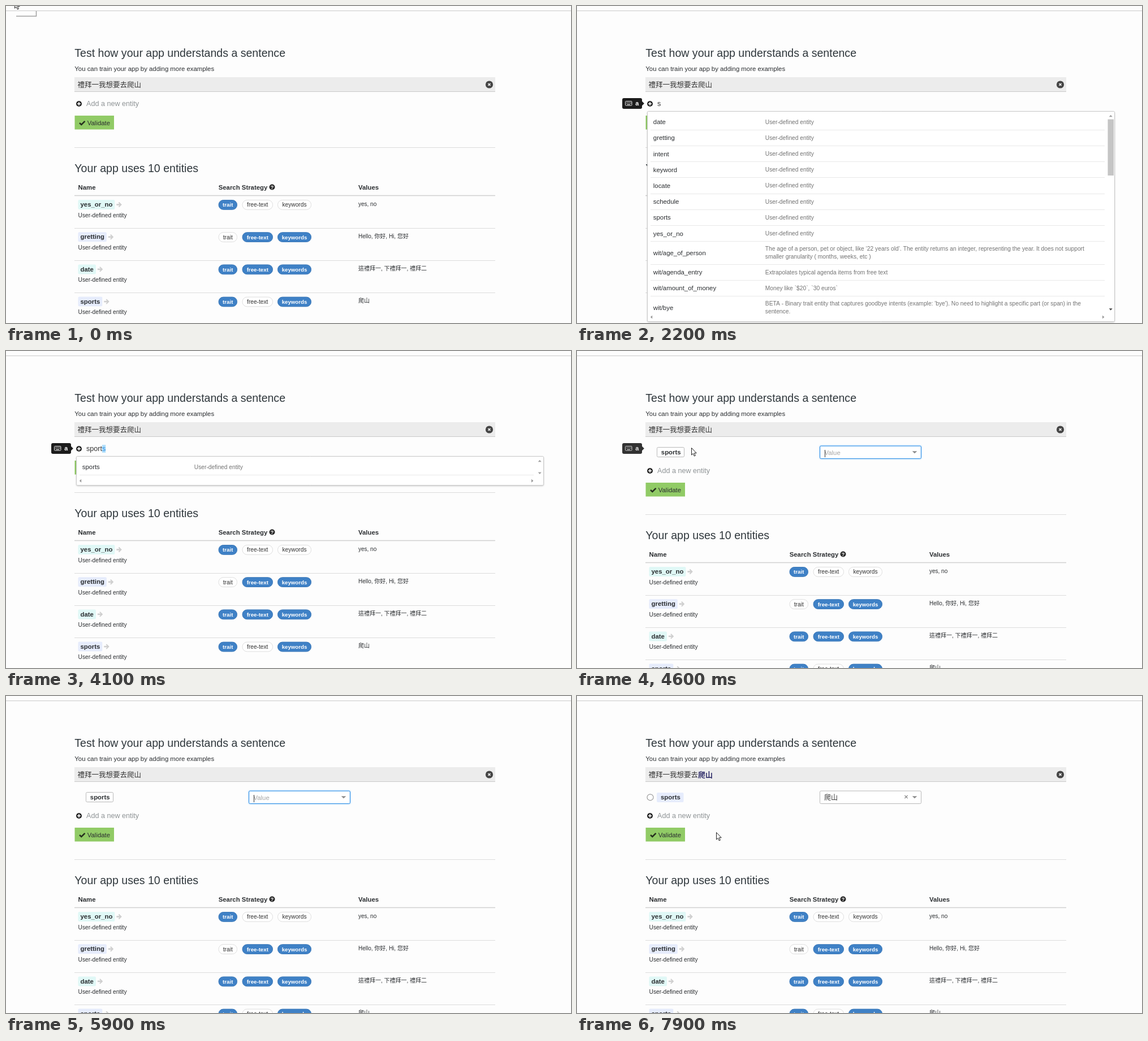
An HTML page with a canvas for the animation above (8000 ms loop, 999x561 px).

```html
<!DOCTYPE html>
<html lang="en">
<head>
<meta charset="utf-8">
<title>Entity trainer</title>
<style>
  html, body { margin: 0; width: 999px; height: 561px; overflow: hidden; background: #fdfdfd; }
  canvas { display: block; }
</style>
</head>
<body>
<canvas id="stage" width="999" height="561"></canvas>
<script>
const g = document.getElementById('stage').getContext('2d');
const LOOP = 8000;
const FONT = '"Liberation Sans", Arial, "Noto Sans CJK TC", "Noto Sans CJK", sans-serif';
const BODY = 11.38, SMALL = 10.26, TITLE = 19.56;
const DARK = '#2b2e31', GREY = '#737373', LILAC = '#e6ecfc', AQUA = '#e0f8f6';
const USER = 'User-defined entity';
const SENTENCE = '禮拜一我想要去爬山';

const entities = [
  { name: 'yes_or_no', tint: AQUA, on: [1, 0, 0], values: 'yes, no' },
  { name: 'gretting', tint: LILAC, on: [0, 1, 1], values: 'Hello, 你好, Hi, 您好' },
  { name: 'date', tint: AQUA, on: [1, 1, 1], values: '這禮拜一, 下禮拜一, 禮拜二' },
  { name: 'sports', tint: LILAC, on: [1, 0, 1], values: '爬山' }
];
const pills = [['trait', 375.5, 33.5], ['free-text', 417.5, 54.5], ['keywords', 480, 60]];

const allOptions = [
  ...['date', 'gretting', 'intent', 'keyword', 'locate', 'schedule', 'sports', 'yes_or_no'].map(n => [n, USER]),
  ['wit/age_of_person', 'The age of a person, pet or object, like ‘22 years old’. The entity returns an integer, representing the year. It does not support', 'smaller granularity ( months, weeks, etc )'],
  ['wit/agenda_entry', 'Extrapolates typical agenda items from free text'],
  ['wit/amount_of_money', 'Money like `$20`, `30 euros`'],
  ['wit/bye', "BETA - Binary trait entity that captures goodbye intents (example: 'bye'). No need to highlight a specific part (or span) in the", 'sentence.']
];
const sOptions = [
  ['schedule', USER], ['sports', USER],
  ['wit/search_query', 'Captures free text to be used as a query for a search engine. The part to look up has to be highlighted in', 'the sentence.']
];

// Pointer stops as [ms, x, y]; without a position the arrow is hidden
const pointer = [
  [0, 15, -9], [100, 14, 14], [200, 42, 68], [300, 96, 118], [400, 152, 150], [500, 190, 165], [600],
  [4600, 202, 171], [5400, 420, 214], [5500, 578, 234], [5600, 584, 216], [5700, 560, 196], [5800],
  [6000, 330, 160], [6100, 250, 153], [6200], [7700, 246, 168], [7800, 249, 215], [7900, 246, 241]
];
const typed = [[2200, 1], [2500, 2], [2700, 3], [3800, 4], [4100, 5], [4400, 6]];

const latest = (list, t) => list.filter(s => s[0] <= t).pop();
const within = (t, a, b) => t >= a && t < b;

function text(s, x, y, size = BODY, color = DARK, bold = false, align = 'left') {
  g.font = `${bold ? 'bold ' : ''}${size}px ${FONT}`;
  g.fillStyle = color;
  g.textAlign = align;
  g.fillText(s, x, y);
  return g.measureText(s).width;
}

function rect(x, y, w, h, fill, radius = 0, border) {
  g.beginPath();
  g.roundRect(x, y, w, h, radius);
  if (fill) { g.fillStyle = fill; g.fill(); }
  if (border) { g.strokeStyle = border; g.lineWidth = 1; g.stroke(); }
}

function path(points, fill, stroke, width = 1) {
  g.beginPath();
  points.forEach(p => g.lineTo(...p));
  if (fill) { g.closePath(); g.fillStyle = fill; g.fill(); }
  if (stroke) { g.strokeStyle = stroke; g.lineWidth = width; g.stroke(); }
}

function disc(x, y, r, fill, stroke) {
  g.beginPath();
  g.arc(x, y, r, 0, 7);
  if (fill) { g.fillStyle = fill; g.fill(); }
  if (stroke) { g.strokeStyle = stroke; g.lineWidth = 1.2; g.stroke(); }
}

function cross(x, y, r, color, width) {
  path([[x - r, y - r], [x + r, y + r]], null, color, width);
  path([[x - r, y + r], [x + r, y - r]], null, color, width);
}

// Small triangle pointing along (dx, dy)
function triangle(x, y, dx, dy, color, w = 3, h = 1.7) {
  path([[x + dx * h, y + dy * h], [x - dx * h + dy * w, y - dy * h + dx * w],
    [x - dx * h - dy * w, y - dy * h - dx * w]], color);
}

function header(t) {
  rect(0, 8, 999, 1, '#cbcbcb');
  if (t < 100) {
    rect(17, 9, 36, 8, '#fff');
    path([[18, 18], [53.5, 18], [53.5, 9]], null, '#a2a2a2', 1.6);
  }
  text('Test how your app understands a sentence', 121.3, 90, TITLE, '#2f373c');
  text('You can train your app by adding more examples', 121.3, 114.5);
}

function sentence(t) {
  rect(121, 126, 744, 26, '#ececec');
  rect(121, 151, 744, 1, '#c9c9c9');
  disc(854.5, 139, 6.6, '#454545');
  cross(854.5, 139, 2, '#fff', 1.4);

  const picked = within(t, 6700, 7500) ? (t < 6800 ? 1 : 2) : 0;
  const done = t >= 7500;
  const split = done || picked ? 7 : 9;
  let x = 126.5 + text(SENTENCE.slice(0, split), 126.5, 143.7, 12.5, '#333');
  if (picked) {
    rect(x, 132, 12.5 * picked, 14, '#b4dcf7');
    x += text(SENTENCE.slice(7, 7 + picked), x, 143.7, 12.5, '#2b8fe3');
    text(SENTENCE.slice(7 + picked), x, 143.7, 12.5, '#333');
  } else if (done) {
    text(SENTENCE.slice(7), x, 143.7, 12.9, '#2d2b68', true);
  }
  if (within(t, 6200, 7700)) {
    const beam = t < 6300 ? 207 : t < 6400 ? 210 : t < 6700 ? 214 : t < 6800 ? 227 : 242;
    rect(beam, 136, 1, 13, '#f8f8f8');
  }
}

function entityRow(t) {
  const linked = t >= 7200, focused = t < 6600;
  if (linked) {
    disc(129.5, 179.3, 5.5, '#fff', '#999');
    rect(141, 171, 47.5, 17, LILAC, 2);
  } else {
    rect(141.5, 170.5, 48, 17, '#fff', 2, '#b9b9b9');
  }
  text('sports', linked ? 148 : 148.8, 183.3, BODY, DARK, true);

  if (focused) {
    g.shadowColor = '#a5d3fa';
    g.shadowBlur = 3;
  }
  rect(429.5, 168, 179, 22.5, '#fff', 2, focused ? '#2f8fe6' : '#b8b8b8');
  g.shadowBlur = 0;
  triangle(597, 179.3, 0, 1, '#8b8b8b', 4.3, 2);
  if (linked) {
    text('爬山', 437, 184, 12, '#333');
    cross(582, 178.5, 2.6, '#808080', 1.3);
  } else {
    text('Value', 437.5, 183.5, BODY, '#a6a6a6');
  }
  if (within(t, 4600, 5100) || within(t, 5600, 6100)) rect(438, 175, 1, 13, '#333');
}

function addEntity(t) {
  disc(129, 173, 5.1, '#2d2d2d');
  rect(126, 172.2, 6, 1.6, '#fff');
  rect(128.2, 170, 1.6, 6, '#fff');
  const count = t < 4600 && latest(typed, t);
  if (count) {
    const word = t < 2500 ? 'schedule' : 'sports';
    const x = 142 + text(word.slice(0, count[1]), 142, 177, 12.6, '#333');
    const rest = t < 2300 ? '' : word.slice(count[1]);
    if (rest) {
      rect(x, 166, g.measureText(rest).width, 14, '#b4e0fb');
      text(rest, x, 177, 12.6, '#2b8fe3');
    }
  } else {
    text('Add a new entity', 142, 177, 12.6, within(t, 700, 4600) ? '#b8bcbf' : '#8f9496');
  }
  if (within(t, 700, 1200) || within(t, 1700, 2200)) rect(142, 167, 1, 13, '#333');
}

function validate() {
  rect(121.5, 194, 69.5, 24.5, '#91cb66');
  path([[130, 207], [133.3, 210], [139.5, 203.8]], null, '#26301f', 2.5);
  text('Validate', 143.8, 210.8);
}

function table() {
  rect(121, 250, 744, 1, '#dcdcdc');
  text('Your app uses 10 entities', 121.3, 294, TITLE, '#2f373c');
  text('Name', 127.5, 324.5, BODY, DARK, true);
  text('Search Strategy', 375.7, 324.5, BODY, DARK, true);
  disc(470.5, 320.5, 5, '#2b2b2b');
  text('?', 470.5, 323.9, 9, '#fff', true, 'center');
  text('Values', 623, 324.5, BODY, DARK, true);
  rect(121, 334.7, 744, 1.5, '#d0d0d0');

  entities.forEach((e, i) => {
    const y = 351.5 + i * 57.2;
    g.font = `bold ${BODY}px ${FONT}`;
    const w = g.measureText(e.name).width;
    rect(127.5, y - 8.5, w + 8, 17, e.tint, 2);
    text(e.name, 131.5, y + 3.7, BODY, DARK, true);
    const a = 127.5 + w + 11;
    path([[a, y], [a + 7.5, y]], null, '#cfcfcf', 2.6);
    path([[a + 4, y - 4], [a + 8, y], [a + 4, y + 4]], null, '#cfcfcf', 2);
    text(USER, 127.5, y + 22.3, SMALL);
    pills.forEach(([label, x, pw], k) => {
      const on = e.on[k];
      rect(x + .5, y - 8, pw - 1, 16.8, on ? '#3f81c6' : '#fff', 8.2, on ? '#3b78b8' : '#dedede');
      text(label, x + pw / 2, y + 3.8, on ? 9.7 : 10.2, on ? '#fff' : '#333', on, 'center');
    });
    text(e.values, 623, y + 2, 10);
    rect(121, Math.round(y + 41), 744, 1, '#dcdcdc');
  });
}

function dropdown(t) {
  const options = t < 2300 ? allOptions : t < 2500 ? sOptions : [['sports', USER]];
  const full = options === allOptions;
  const height = o => o[2] ? 40.5 : 28.2;
  const bottom = full ? 558.5 : 209.5 + options.reduce((sum, o) => sum + height(o), 0);

  g.shadowColor = 'rgba(0,0,0,.25)';
  g.shadowBlur = 3;
  g.shadowOffsetY = 1;
  rect(124.5, 186.5, 826, bottom - 186.5, '#fff', 2);
  g.shadowColor = 'transparent';
  g.shadowBlur = g.shadowOffsetY = 0;
  rect(124.5, 186.5, 826, bottom - 186.5, null, 2, '#c9c9c9');

  let y = 191;
  options.forEach((o, i) => {
    const h = height(o), mid = y + h / 2;
    text(o[0], 134.8, mid + 4);
    if (o[2]) {
      text(o[1], 332.8, mid - 4.2, SMALL, GREY);
      text(o[2], 332.8, mid + 10, SMALL, GREY);
    } else {
      text(o[1], 332.8, mid + 3.4, SMALL, GREY);
    }
    y += h;
    if (!full || i < options.length - 1) rect(130, Math.round(y - .4), 803, 1, '#e8e8e8');
  });

  triangle(943.7, 194.5, 0, -1, '#a0a0a0');
  triangle(943.7, bottom - 21.5, 0, 1, full ? '#444' : '#a0a0a0');
  triangle(131.5, bottom - 8, -1, 0, '#999');
  triangle(930.7, bottom - 8, 1, 0, '#999');
  if (full) rect(938.5, 200.5, 10.5, 99.5, '#c5c5c5');
}

function shortcut(t) {
  const alpha = t < 700 ? 0 : t < 800 ? .4 : t < 900 ? .8 : t < 4600 ? 1 : t < 4700 ? .9 : t < 4800 ? .4 : 0;
  if (!alpha) return;
  g.globalAlpha = alpha;
  rect(80, 163, 35, 19, '#1c1c1c', 3);
  path([[114.8, 168.5], [118.8, 172.5], [114.8, 176.5]], '#1c1c1c');
  rect(85.5, 168.5, 11.5, 7.5, '#1c1c1c', 1, '#ddd');
  for (const y of [170, 172])
    for (let x = 87; x < 96; x += 2) rect(x, y, 1.2, 1.1, '#ddd');
  rect(88.5, 174, 5.5, 1, '#ddd');
  text('a', 103.2, 176, 10.8, '#fff', true);
  g.globalAlpha = 1;
}

function arrow(t) {
  const [, x, y] = latest(pointer, t);
  if (x === undefined) return;
  const shape = [[0, 0], [0, 12.5], [2.8, 9.9], [4.8, 14.5], [6.8, 13.6], [4.9, 9.2], [8.7, 9.2], [0, 0]];
  path(shape.map(p => [x + .5 + p[0], y + .5 + p[1]]), '#fff', '#222', 1);
}

function draw(t) {
  const added = t >= 4600;
  rect(0, 0, 999, 561, '#fdfdfd');
  header(t);
  sentence(t);
  if (added) entityRow(t);
  g.save();
  if (added) g.translate(0, 39);
  addEntity(t);
  validate();
  table();
  g.restore();
  if (within(t, 700, 4600)) dropdown(t);
  shortcut(t);
  arrow(t);
}

const start = performance.now();
function tick() {
  const t = (performance.now() - start) % LOOP;
  draw(Math.floor(t / 100) * 100);
  requestAnimationFrame(tick);
}
tick();
</script>
</body>
</html>
```
